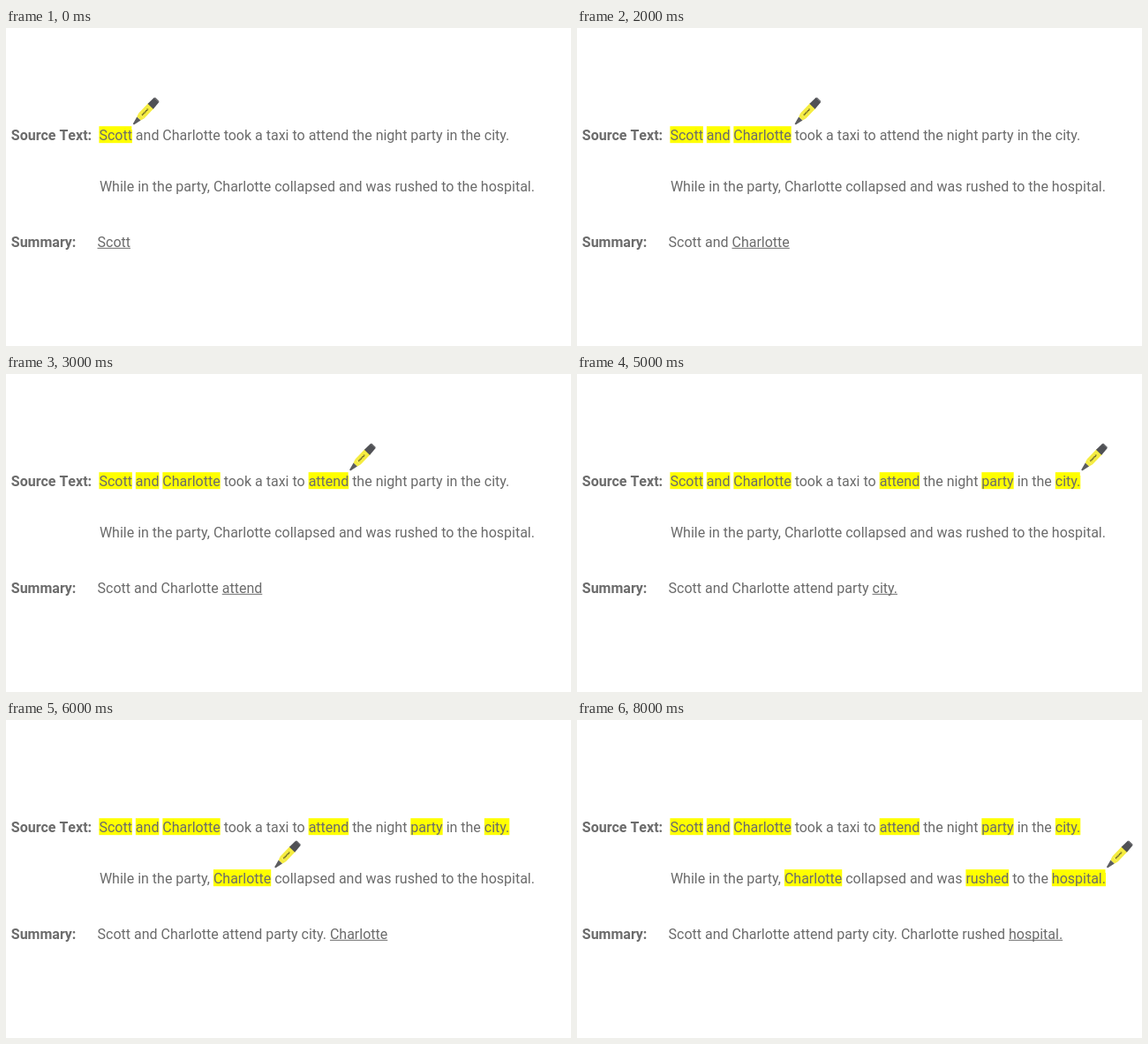
Recreate the animation shown at these times as an HTML page with a canvas. Size 640 px wide and 360 px high, loop 9000 ms.

```html
<!DOCTYPE html>
<html lang="en">
<head>
<meta charset="utf-8">
<title>Extractive summary</title>
<style>
html, body { margin: 0; width: 100%; height: 100%; overflow: hidden; background: #fff; }
canvas { display: block; width: 640px; height: 360px; }
</style>
</head>
<body>
<canvas id="stage" width="640" height="360"></canvas>
<script>
const ctx = document.getElementById('stage').getContext('2d');
const STEP = 1000;
const INK = '#6b6b6b';
const REGULAR = '16px Roboto, sans-serif';
const BOLD = 'bold 16px Roboto, sans-serif';
const NEAR = 1.5, FAR = 4.5;

const lines = [
  { x: 105.4, y: 126.5, text: 'Scott and Charlotte took a taxi to attend the night party in the city.' },
  { x: 105.9, y: 184.5, text: 'While in the party, Charlotte collapsed and was rushed to the hospital.' }
];
const summary = { x: 103.5, y: 247.6 };

const pick = (line, word, gap) => ({ line: lines[line], word, gap });
const picks = [
  pick(0, 'Scott', NEAR), pick(0, 'and', FAR), pick(0, 'Charlotte', FAR),
  pick(0, 'attend', NEAR), pick(0, 'party', FAR), pick(0, 'city.', NEAR),
  pick(1, 'Charlotte', FAR), pick(1, 'rushed', FAR), pick(1, 'hospital.', NEAR)
];

function useFont(font) {
  ctx.font = font;
  ctx.fontKerning = font === BOLD ? 'none' : 'auto';
}

function width(text) {
  useFont(REGULAR);
  return ctx.measureText(text).width;
}

function write(text, x, y, font = REGULAR) {
  useFont(font);
  ctx.fillStyle = INK;
  ctx.fillText(text, x, y);
}

function box(color, x, y, w, h) {
  ctx.fillStyle = color;
  ctx.fillRect(x, y, w, h);
}

function wordStart({ line, word }) {
  return line.x + width(line.text.slice(0, line.text.indexOf(word)));
}

function highlight(p) {
  box('#ffff00', wordStart(p), p.line.y - 15.3, width(p.word), 19);
}

// Part of the pen between a and b along its axis, with a half width at each end
function part(color, a, halfA, b, halfB) {
  ctx.fillStyle = color;
  ctx.beginPath();
  ctx.moveTo(a, -halfA);
  ctx.lineTo(b, -halfB);
  ctx.lineTo(b, halfB);
  ctx.lineTo(a, halfA);
  ctx.fill();
}

function pen(x, y) {
  box('#fff', x - 2, y - 31, 33, 37);
  ctx.save();
  ctx.translate(x, y);
  ctx.rotate(-Math.PI * 0.258);
  part('#5c5d60', 0, 0.8, 9, 3);
  part('#f5ec40', 9, 3, 13, 4.3);
  part('#f5ec40', 13, 4.3, 29, 4.3);
  part('#505155', 28, 4.3, 38, 3.8);
  part('#505155', 38, 3.8, 39, 2.8);
  ctx.strokeStyle = '#6f6a2c';
  ctx.beginPath();
  for (let i = 0; i <= 10; i++) ctx.lineTo(14 + i, 0.5 * Math.cos(i * Math.PI));
  ctx.stroke();
  ctx.restore();
}

function draw(step) {
  box('#fff', 0, 0, 640, 360);

  const shown = picks.slice(0, step + 1);
  shown.forEach(highlight);
  write('Source Text:', 5.8, lines[0].y, BOLD);
  write('Summary:', 5.8, summary.y, BOLD);
  lines.forEach(l => write(l.text, l.x, l.y));

  const now = picks[step];
  const text = shown.map(p => p.word).join(' ');
  const w = width(now.word);
  write(text, summary.x, summary.y);
  box(INK, summary.x + width(text) - w, summary.y + 1.2, w, 1);

  pen(wordStart(now) + w + now.gap, now.line.y - 17.5);
}

function tick(now) {
  draw(Math.floor(now / STEP) % picks.length);
  requestAnimationFrame(tick);
}
draw(0);
requestAnimationFrame(tick);
</script>
</body>
</html>
```
